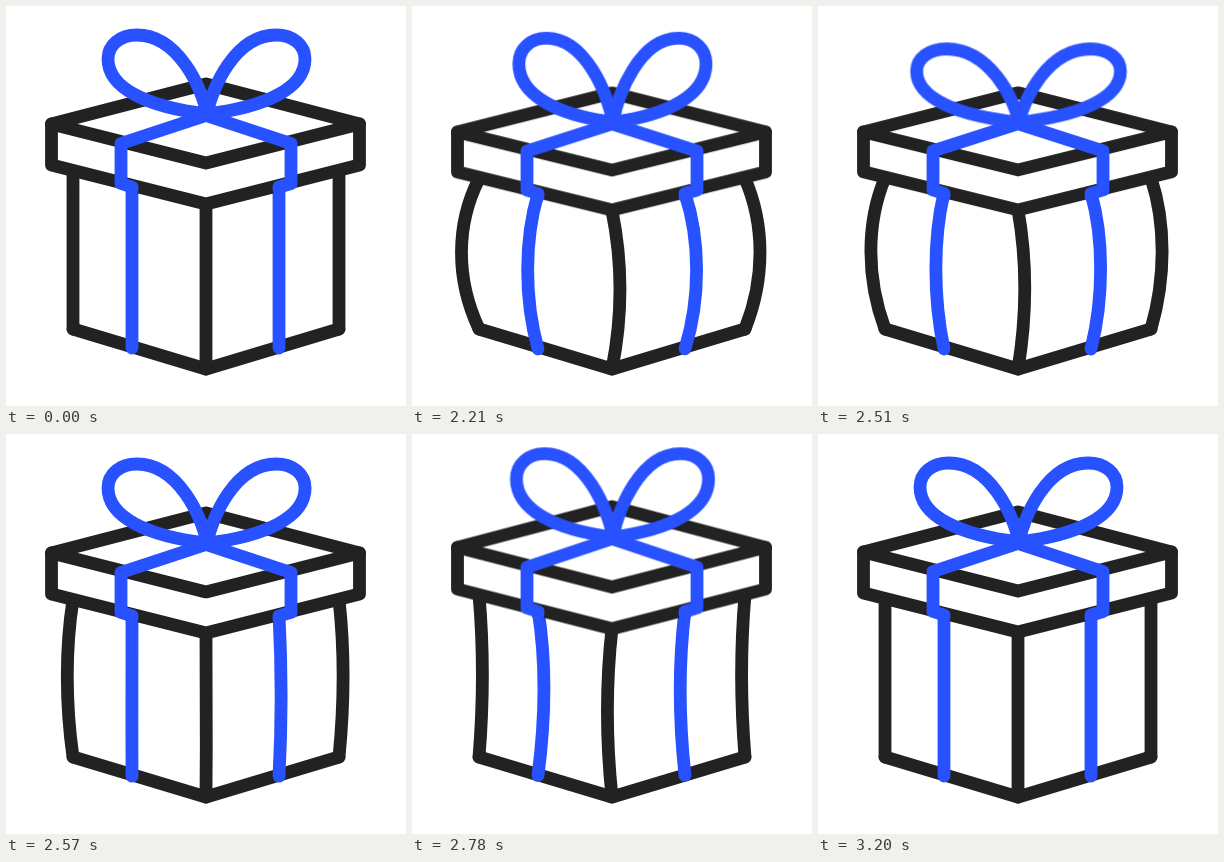
An HTML page without scripts that plays this animation: 400x400 px, repeating every 3230 ms.

```html
<!DOCTYPE html>
<html lang="en">
<head>
<meta charset="utf-8">
<title>Gift box</title>
<style>
  html, body { margin: 0; width: 100%; height: 100%; overflow: hidden; background: #fff; }
  svg { display: block; width: 100%; height: 100%; }
  path {
    fill: none; stroke: #222; stroke-width: 12.8;
    stroke-linecap: round; stroke-linejoin: round;
    vector-effect: non-scaling-stroke;
  }
  .ribbon { stroke: #2852ff; }
  .panel { fill: #fff; }

  .lid, .bow, .edges, .bands { animation: 3230ms infinite; }
  .lid { animation-name: bounce; transform-origin: 200px 198px; }
  .bow { animation-name: sway; transform-origin: 200px 109px; }
  .edges { animation-name: bend-edges; }
  .bands { animation-name: bend-bands; }

  /* Rest until 2030 ms, squash, spring up, settle */
  @keyframes bounce {
    0%, 62.84% { transform: none; animation-timing-function: linear; }
    62.85% { transform: translateY(.8px) scaleY(.996); animation-timing-function: cubic-bezier(.3,.4,.7,.85); }
    68.42% { transform: translateY(6px) scaleY(.975); animation-timing-function: ease-out; }
    73.07% { transform: translateY(8px) scaleY(.967); animation-timing-function: ease-in; }
    77.71% { transform: translateY(6px) scaleY(.975); animation-timing-function: linear; }
    82.35% { transform: translateY(-6.5px) scaleY(1.035); animation-timing-function: ease-out; }
    83.28% { transform: translateY(-7.5px) scaleY(1.039); animation-timing-function: ease-in-out; }
    89.78% { transform: translateY(3.5px) scaleY(.985); animation-timing-function: ease-in-out; }
    94.74% { transform: translateY(-1.5px) scaleY(1.005); animation-timing-function: ease-in-out; }
    99.07%, 100% { transform: none; }
  }
  /* The bow lags behind the lid */
  @keyframes sway {
    0%, 62.84% { transform: none; animation-timing-function: linear; }
    62.85% { transform: scale(.99, 1.01); animation-timing-function: ease-out; }
    68.42% { transform: scale(.95, 1.09); animation-timing-function: ease-in-out; }
    77.71% { transform: scale(1.035, .95); animation-timing-function: linear; }
    82.35% { transform: scale(.95, 1.075); animation-timing-function: ease-in-out; }
    89.78%, 100% { transform: none; }
  }
  @keyframes bend-edges {
    0%, 62.84% {
      d: path("M67 165c0 52 0 105 0 158M200 198c0 55 0 110 0 165M333 165c0 52 0 105 0 158");
      animation-timing-function: linear;
    }
    62.85% {
      d: path("M67 166c-4 52 -4 105 0 157M200 199c2 55 2 110 0 164M333 166c4 52 4 105 0 157");
      animation-timing-function: cubic-bezier(.39,.575,.565,1);
    }
    72.14% {
      d: path("M67 174c-27 45 -27 100 0 149M200 206c12 50 12 105 0 157M333 174c23 45 23 100 0 149");
      animation-timing-function: ease-in;
    }
    77.71% {
      d: path("M67 172c-19 45 -19 100 0 151M200 204c9 50 9 105 0 159M333 172c15 45 15 100 0 151");
      animation-timing-function: linear;
    }
    82.35% {
      d: path("M67 157c9 50 9 110 0 166M200 191c-12 50 -12 115 0 172M333 157c-9 50 -9 110 0 166");
      animation-timing-function: ease-in-out;
    }
    89.78%, 100% {
      d: path("M67 165c0 52 0 105 0 158M200 198c0 55 0 110 0 165M333 165c0 52 0 105 0 158");
    }
  }
  @keyframes bend-bands {
    0%, 62.84% {
      d: path("M126 180c0 54 0 108 0 162M273 180c0 54 0 108 0 162");
      animation-timing-function: linear;
    }
    62.85% {
      d: path("M126 181c-2 54 -2 108 0 161M273 181c2 54 2 108 0 161");
      animation-timing-function: cubic-bezier(.39,.575,.565,1);
    }
    72.14% {
      d: path("M126 189c-16 45 -16 105 0 154M273 189c18 45 18 105 0 154");
      animation-timing-function: ease-in;
    }
    77.71% {
      d: path("M126 187c-11 45 -11 105 0 156M273 187c13 45 13 105 0 156");
      animation-timing-function: linear;
    }
    82.35% {
      d: path("M126 172c17 50 15 110 0 169M273 172c-13 50 -12 115 0 169");
      animation-timing-function: ease-in-out;
    }
    89.78%, 100% {
      d: path("M126 180c0 54 0 108 0 162M273 180c0 54 0 108 0 162");
    }
  }
</style>
</head>
<body>
<svg viewBox="0 0 400 400">
  <path d="M67 323L200 363L333 323"/>
  <path class="edges" d="M67 165V323M200 198V363M333 165V323"/>
  <path class="ribbon bands" d="M126 180V342M273 180V342"/>
  <g class="lid">
    <path class="panel" d="M45.5 118L200 78L353.5 118V159L200 198L45.5 159Z"/>
    <path d="M45.5 118L200 157L353.5 118"/>
    <path class="ribbon" d="M126 184V181L115 177.5V137.5L200 109.5L285 137.5V177.5L273 181V184"/>
    <g class="bow">
      <path class="ribbon" d="M201 108C196 82 172 29 131 29C114 29 102 39 102 53C102 82 141 101 201 108"/>
      <path class="ribbon" d="M201 108C206 82 229 29 270 29C287 29 299 39 299 53C299 82 260 101 201 108"/>
    </g>
  </g>
</svg>
</body>
</html>
```
